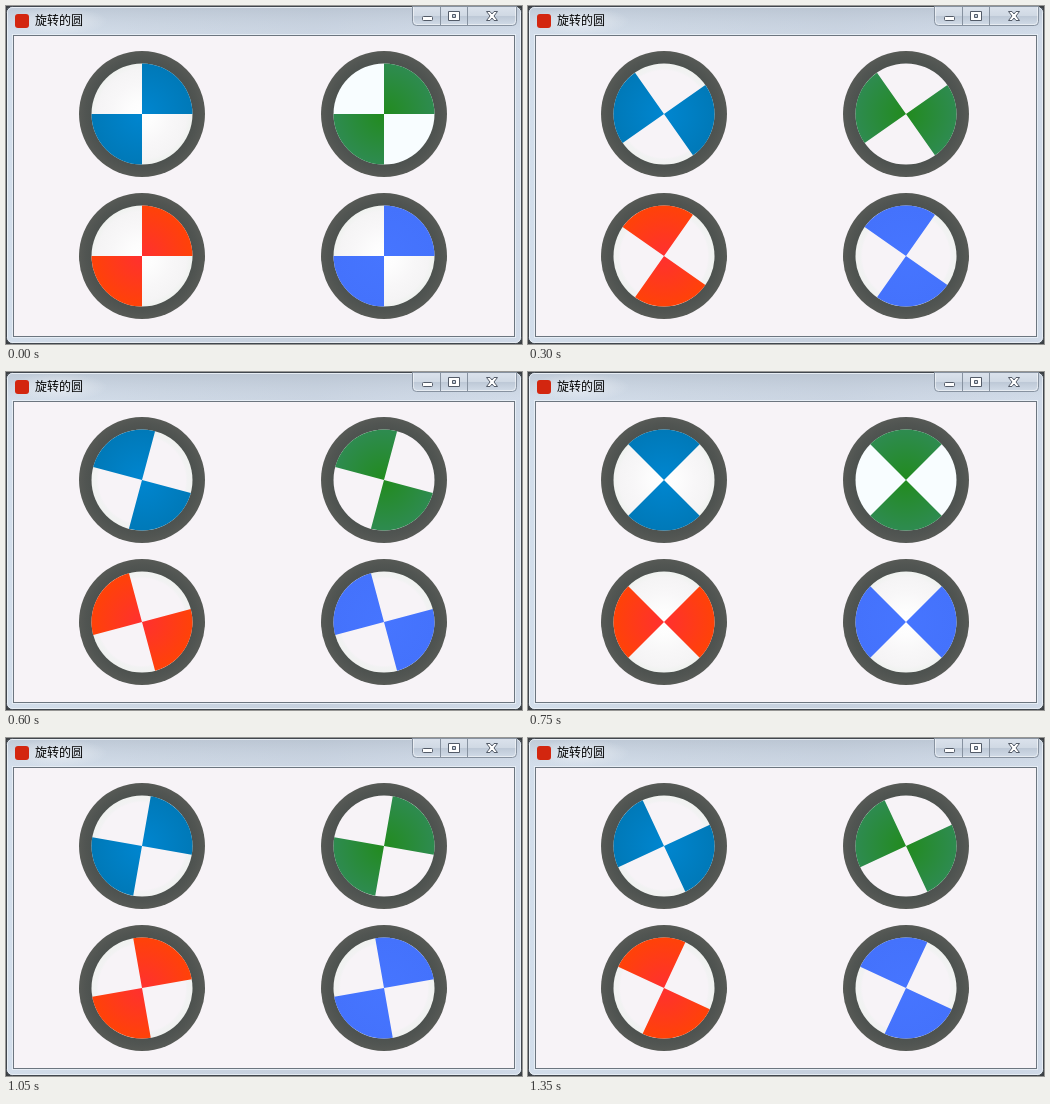
An HTML page that plays this animation: 516x338 px, repeating every 1.5 s.

```html
<!DOCTYPE html>
<html lang="zh">
<head>
<meta charset="utf-8">
<title>旋转的圆</title>
<style>
  html, body { margin: 0; width: 516px; height: 338px; overflow: hidden; background: #3c4044; }
  svg { display: block; }
  text { font: 12px "Noto Sans CJK SC", "Noto Sans CJK", "Noto Sans CJK JP", sans-serif; }
</style>
</head>
<body>
<svg id="stage" width="516" height="338" viewBox="0 0 516 338">
  <defs>
    <linearGradient id="frame" x1="0" y1="0" x2="1" y2="0">
      <stop offset="0" stop-color="#d3deeb"/>
      <stop offset=".3" stop-color="#cbd5e2"/>
      <stop offset=".6" stop-color="#c6d0de"/>
      <stop offset="1" stop-color="#d0dae8"/>
    </linearGradient>
    <linearGradient id="bar" x1="0" y1="0" x2="0" y2="1">
      <stop offset="0" stop-color="#b4bfcc" stop-opacity=".6"/>
      <stop offset="1" stop-color="#d6e0ec" stop-opacity=".3"/>
    </linearGradient>
    <linearGradient id="button" x1="0" y1="0" x2="0" y2="1">
      <stop offset="0" stop-color="#dbe2ec"/>
      <stop offset=".48" stop-color="#d0d9e4"/>
      <stop offset=".5" stop-color="#bdc8d6"/>
      <stop offset="1" stop-color="#d2dce8"/>
    </linearGradient>
    <radialGradient id="glow">
      <stop offset="0" stop-color="#fff" stop-opacity=".5"/>
      <stop offset="1" stop-color="#fff" stop-opacity="0"/>
    </radialGradient>
  </defs>

  <!-- window frame -->
  <rect x=".5" y=".5" width="515" height="337" rx="6" fill="url(#frame)" stroke="#41474e"/>
  <rect x="1.5" y="1.5" width="513" height="335" rx="5" fill="none" stroke="#eef3f8" stroke-opacity=".8"/>
  <rect x="2" y="2" width="512" height="27" rx="4" fill="url(#bar)"/>
  <ellipse cx="52" cy="15" rx="50" ry="14" fill="url(#glow)"/>
  <rect x="6.5" y="28.5" width="503" height="303" fill="none" stroke="#e6edf5"/>
  <rect x="7.5" y="29.5" width="501" height="301" fill="#f7f3f7" stroke="#6c757f"/>

  <!-- title -->
  <rect x="9" y="8" width="14" height="14" rx="3" fill="#d3260f"/>
  <text x="29" y="19" fill="#000">旋转的圆</text>

  <!-- window buttons -->
  <path d="M406.5 .5V15.5q0 4 4 4H506.5q4 0 4 -4V.5z" fill="url(#button)" stroke="#8792a0"/>
  <path d="M407.5 1V15q0 3.500 3.500 3.500H506q3.500 0 3.500 -3.500V1" fill="none" stroke="#fff" stroke-opacity=".5"/>
  <path d="M434.500 1V19M461.500 1V19" stroke="#8792a0"/>
  <g fill="#fff" stroke="#535b68">
    <rect x="416.500" y="10.500" width="10" height="4" rx="1"/>
    <path fill-rule="evenodd" d="M442.500 5.500h11v9h-11zM446.500 8.500v3h3v-3z"/>
    <path d="M480.500 5.500h3.500l2 2.500 2 -2.500h3.500l-3.500 4.500 3.500 4.500h-3.500l-2 -2.500 -2 2.500h-3.500l3.500 -4.500z"/>
  </g>
</svg>
<script>
const NS = "http://www.w3.org/2000/svg";
const stage = document.getElementById("stage");
const STEP = 150;
const ANGLES = [0, 25, 55, 80, 105, 135, 165, 190, 215, 245];
const BRIGHT_STEPS = [0, 5];
const R = 50.5;

const DISCS = [
  { x: 136, y: 108, dir: 1, inner: "#0086d0", outer: "#0079b8" },
  { x: 378, y: 108, dir: 1, inner: "#228b1e", outer: "#2e8b50", pale: "#f8fdff" },
  { x: 136, y: 250, dir: -1, inner: "#ff3030", outer: "#ff4208" },
  { x: 378, y: 250, dir: -1, inner: "#4675ff", outer: "#4472fc" }
];

function add(parent, tag, attrs) {
  const el = document.createElementNS(NS, tag);
  for (const key in attrs) el.setAttribute(key, attrs[key]);
  parent.appendChild(el);
  return el;
}

function radial(id, r, stops) {
  const g = add(stage.querySelector("defs"), "radialGradient",
    { id, gradientUnits: "userSpaceOnUse", cx: 0, cy: 0, r });
  for (const [offset, color] of stops) add(g, "stop", { offset, "stop-color": color });
  return `url(#${id})`;
}

const rim = radial("rim", 63, [[.8, "#4d524f"], [.9, "#515552"], [1, "#575a56"]]);
const flat = radial("flat", R, [[.86, "#f7f3f7"], [.9, "#f2f2f3"], [1, "#f0f2f0"]]);
const bright = radial("bright", R,
  [[0, "#ffffff"], [.25, "#fdfdfd"], [.6, "#f8f7f8"], [.88, "#f5f4f5"], [1, "#eff2ef"]]);

const spinners = DISCS.map((d, i) => {
  const g = add(stage, "g", { transform: `translate(${d.x} ${d.y})` });
  add(g, "circle", { r: 63, fill: rim });
  const base = add(g, "circle", { r: R });
  const fill = radial("paint" + i, R, [[0, d.inner], [1, d.outer]]);
  const wedges = add(g, "path", {
    d: `M0 0V${-R}A${R} ${R} 0 0 1 ${R} 0zM0 0V${R}A${R} ${R} 0 0 1 ${-R} 0z`, fill
  });
  return { base, wedges, dir: d.dir, flat: d.pale ? "#f7f3f7" : flat, bright: d.pale || bright };
});

function draw(time) {
  const step = Math.floor(time / STEP) % ANGLES.length;
  const lit = BRIGHT_STEPS.includes(step);
  for (const s of spinners) {
    s.wedges.setAttribute("transform", `rotate(${s.dir * ANGLES[step]})`);
    s.base.setAttribute("fill", lit ? s.bright : s.flat);
  }
}

const start = performance.now();
function tick() {
  draw(performance.now() - start);
  requestAnimationFrame(tick);
}
tick();
</script>
</body>
</html>
```
